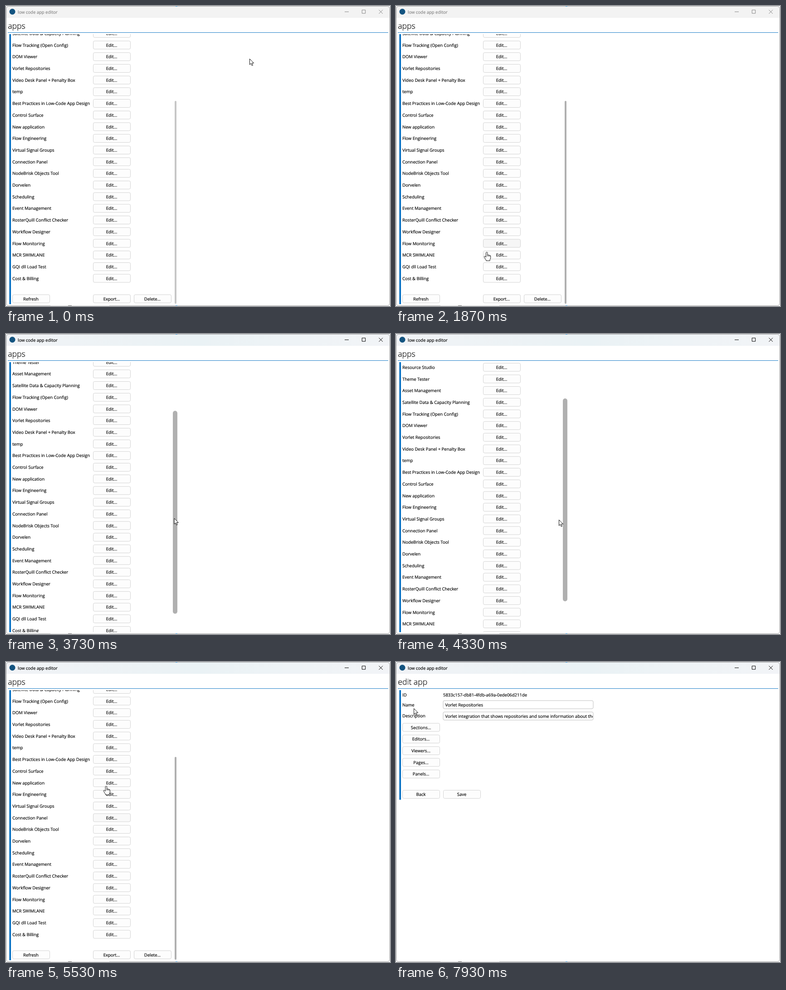
Write an HTML page that moves like this. It is 847x661 px and loops after 8000 ms.

```html
<!DOCTYPE html>
<html lang="en">
<head>
<meta charset="utf-8">
<title>low code app editor</title>
<style>
  html, body { margin: 0; width: 100%; height: 100%; overflow: hidden; background: #fff; }
  svg { display: block; width: 100vw; height: 100vh; }
  text {
    font: 9.5px "Open Sans", "Noto Sans", sans-serif; text-rendering: geometricPrecision;
    white-space: pre; fill: #000; stroke: #000; stroke-width: .18px;
  }
  .head { font-size: 17.6px; font-weight: 300; }
  .mid { text-anchor: middle; }
  .box { stroke: #d3d3d3; }
</style>
</head>
<body>
<svg id="stage" viewBox="0 0 847 661" preserveAspectRatio="none">
  <defs>
    <linearGradient id="bar">
      <stop offset="0" stop-color="#f1f3f6"/>
      <stop offset=".5" stop-color="#eaf2f5"/>
      <stop offset="1" stop-color="#f2f4f7"/>
    </linearGradient>
    <clipPath id="view"><rect x="0" y="62" width="368" height="595"/></clipPath>
    <clipPath id="field"><rect x="105" y="110" width="329" height="19"/></clipPath>
  </defs>
</svg>
<script>
const LOOP = 8000, STEP = 1000 / 15, ROW = 25.7;
const GRAB = 3470, RELEASE = 4930, LAG = 70, GRIP = 251, THUMB_END = 209, PAGE_AT = 6330;

const names = [
  "Device Inventory", "Alarm Overview", "Resource Studio", "Theme Tester", "Asset Management",
  "Satellite Data & Capacity Planning", "Flow Tracking (Open Config)", "DOM Viewer",
  "Vorlet Repositories", "Video Desk Panel + Penalty Box", "temp",
  "Best Practices in Low-Code App Design", "Control Surface", "New application",
  "Flow Engineering", "Virtual Signal Groups", "Connection Panel", "NodeBrisk Objects Tool",
  "Dorvelen", "Scheduling", "Event Management", "RosterQuill Conflict Checker",
  "Workflow Designer", "Flow Monitoring", "MCR SWIMLANE", "GQI dll Load Test", "Cost & Billing"
];

// pointer stops: x, y, arrival and, after a rest, departure
const stops = [
  [537, 116, 0], [611, 317, 330, 1130], [167, 560, 1930, 2000], [78, 618, 2270],
  [215, 522, 2530], [307, 510, 2670], [372, 459, 3000, 3200], [378, 460, 3270, GRAB],
  [365, 364, 3930, 4200], [361, 393, 4260], [359, 409, 4330], [357, 453, 4460],
  [356, 457, 4530], [358, 537, 5000, 5070], [221, 273, 5530], [217, 225, 5670],
  [234, 160, 5870], [238, 138, 6070, 6800], [14, 96, 7530, 7670], [39, 102, 7930]
];

const ramp = (t, a, b) => Math.min(1, Math.max(0, (t - a) / (b - a)));

function pointerAt(t) {
  const i = stops.findLastIndex(s => s[2] <= t);
  const [x, y, arrive, leave = arrive] = stops[i];
  const [nx, ny, next] = stops[i + 1] || [x, y, LOOP];
  const u = ramp(t, leave, next);
  return [x + (nx - x) * u, y + (ny - y) * u];
}

// while held, the thumb trails the pointer
const thumbAt = t => t < GRAB || t > RELEASE ? THUMB_END
  : Math.min(THUMB_END, pointerAt(t - LAG)[1] - GRIP);
const scrollAt = t => (THUMB_END - thumbAt(t)) / .744;
const pageAt = t => t >= PAGE_AT ? 1 : 0;
const timeOf = k => Math.round(k * STEP / 10) * 10;

const stage = document.getElementById("stage");
const set = (el, attrs) => { for (const k in attrs) el.setAttribute(k, attrs[k]); };

function add(parent, tag, attrs = {}, label) {
  const el = document.createElementNS("http://www.w3.org/2000/svg", tag);
  set(el, attrs);
  if (label) el.textContent = label;
  parent.appendChild(el);
  return el;
}
const rect = (p, x, y, width, height, fill, more) =>
  add(p, "rect", { x, y, width, height, fill, ...more });
const text = (p, x, mid, label, more) => add(p, "text", { x, y: mid + 3.6, ...more }, label);

const buttons = [];
function button(parent, x, mid, label, page) {
  const face = rect(parent, x + .5, mid - 9, 82, 18, "#fdfdfd", { rx: 3, class: "box" });
  text(parent, x + 41, mid, label, { class: "mid" });
  buttons.push({ face, x, mid, page, level: [] });
}

// window frame
rect(stage, 0, 0, 847, 661, "#fff");
const bar = rect(stage, 0, 0, 847, 26);
add(stage, "circle", { cx: 14, cy: 12.5, r: 6.5, fill: "#145480" });
const caption = text(stage, 26, 13, "low code app editor");
const controls = add(stage, "path", {
  d: "M747 12.8h9M785.3 8.8h7.4v7.4h-7.4zM822.5 8.5l8.5 8.5M831 8.5l-8.5 8.5", fill: "none"
});
const heading = add(stage, "text", { x: 4.3, y: 50, class: "head" });
rect(stage, 4, 58, 839, 1, "#1f80c8");
const stripe = rect(stage, 7.3, 62, 3.7, 595, "#0a72c4");

// list page
const listPage = add(stage, "g");
const list = add(add(listPage, "g", { "clip-path": "url(#view)" }), "g");
names.forEach((name, i) => {
  const mid = 60.3 + (i - 5) * ROW;
  text(list, 14, mid, name);
  button(list, 192, mid, "Edit...", 0);
});
button(list, 14, 645, "Refresh", 0);
button(list, 192, 645, "Export...", 0);
button(list, 282, 645, "Delete...", 0);
const thumb = rect(listPage, 372, THUMB_END, 4, 447, "#b0b0b0");

// edit page
const editPage = add(stage, "g");
text(editPage, 14, 72, "ID");
text(editPage, 104, 72, "5833c157-db81-4fdb-a69a-0ede06d211de");
text(editPage, 14, 94, "Name");
text(editPage, 14, 118.7, "Description");
const fields = [94, 119].map(mid => ({
  mid, face: rect(editPage, 104, mid - 9, 331, 18, "#fff", { rx: 3 })
}));
text(editPage, 108.5, 94.2, "Vorlet Repositories");
text(add(editPage, "g", { "clip-path": "url(#field)" }), 108.5, 119.2,
  "Vorlet integration that shows repositories and some information about them");
["Sections...", "Editors...", "Viewers...", "Pages...", "Panels..."].forEach((label, i) =>
  button(editPage, 14, 144 + i * ROW, label, 1));
button(editPage, 14, 291.5, "Back", 1);
button(editPage, 104, 291.5, "Save", 1);

// outer border
rect(stage, .5, .5, 846, 660, "none", { rx: 6, stroke: "#a3a3a3" });
rect(stage, 98, 660, 130, 1, "#d8d8d8");
rect(stage, 137, 660, 8, 1, "#555");
for (const y of [0, 660]) rect(stage, 374, y, 4, 1, "#1f80c8");

const pointer = (d, fill = "#fff") =>
  add(stage, "path", { d, fill, stroke: "#111", "stroke-linejoin": "round" });
const pointers = {
  arrow: pointer("M.5 .5V13.2L3.4 10.5 5.4 15.3 7.5 14.4 5.5 9.8H9.6Z"),
  hand: pointer("M-1.8 1.5Q0 -.6 1.6 1.5V7Q3 5.8 4.2 7.2 5.8 6.4 6.6 8 8.4 7.6 8.4 9.6V13" +
    "Q8.2 15.5 6.8 17V19.5H-1.6V18Q-3.5 15.5 -5.6 11.5 -6.4 9.8 -4.6 9.6 -3.4 9.8 -1.8 11.6Z" +
    "M1.6 7v3M4.2 7.4v2.6M6.6 8v2"),
  beam: pointer("M-2.5 -7h5M0 -7V7M-2.5 7h5", "none")
};

function isOver(b, t) {
  const [x, y] = pointerAt(t);
  const mid = b.mid + (b.page ? 0 : scrollAt(t));
  return b.page === pageAt(t) && x >= b.x && x <= b.x + 83 && Math.abs(y - mid) < 9.3;
}

// hover shade of each button: quick in, slow out
const steps = Math.round(LOOP / STEP);
for (const b of buttons) {
  let v = 0;
  for (let k = 0; k < steps; k++) {
    b.level.push(v);
    v = isOver(b, timeOf(k)) ? Math.min(1, v + .4) : Math.max(0, v - .15);
  }
}

function draw(ms) {
  const k = Math.floor((ms % LOOP + 6) / STEP) % steps;
  const t = timeOf(k);
  const [x, y] = pointerAt(t);
  const page = pageAt(t), active = t >= GRAB;
  const ink = active ? "#000" : "#858585";

  set(bar, { fill: active ? "url(#bar)" : "#f3f3f3" });
  caption.style.fill = caption.style.stroke = ink;
  set(controls, { stroke: ink });
  heading.textContent = page ? "edit app" : "apps";
  set(stripe, { height: page ? 241.5 : 595 });
  set(listPage, { display: page ? "none" : "inline" });
  set(editPage, { display: page ? "inline" : "none" });

  set(list, { transform: `translate(0 ${scrollAt(t)})` });
  const wide = ramp(t, 2800, 2930) - ramp(t, 4870, 5000);
  const width = 4 + 6 * wide;
  set(thumb, {
    x: 372 - 4 * wide, y: thumbAt(t), width, rx: width / 2,
    opacity: .7 * (1 - ramp(t, 0, 330)) + ramp(t, 1470, 1670)
  });

  for (const b of buttons) {
    const c = Math.round(253 - 18 * b.level[k]);
    set(b.face, { fill: `rgb(${c},${c},${c})` });
  }
  let kind = buttons.some(b => isOver(b, t)) ? "hand" : "arrow";
  for (const f of fields) {
    const over = page && x > 104 && x < 436 && Math.abs(y - f.mid) < 9;
    set(f.face, { stroke: over ? "#888" : "#c0c0c0" });
    if (over) kind = "beam";
  }
  for (const name in pointers)
    set(pointers[name], {
      display: name === kind ? "inline" : "none", transform: `translate(${x} ${y})`
    });
}

const start = performance.now();
function tick() {
  draw(performance.now() - start);
  requestAnimationFrame(tick);
}
tick();
</script>
</body>
</html>
```
